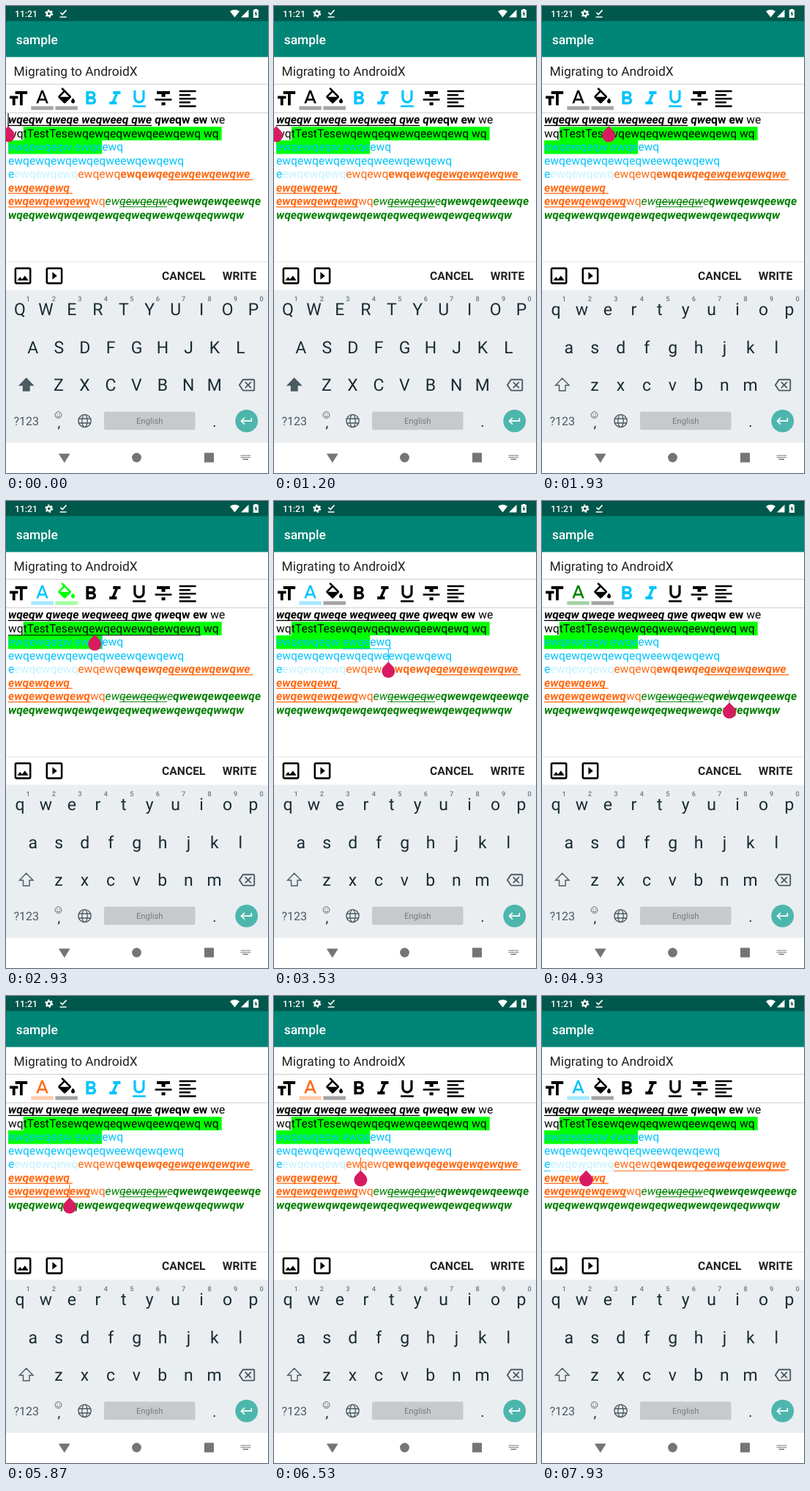
An HTML page that plays this animation: 358x636 px, repeating every 8000 ms.

```html
<!DOCTYPE html>
<html lang="en">
<head>
<meta charset="utf-8">
<title>Rich text editor</title>
<style>
html, body { margin: 0; width: 100%; height: 100%; overflow: hidden; background: #fff; }
svg { display: block; width: 100vw; height: 100vh; }
text { font-family: Roboto, "Noto Sans", sans-serif; white-space: pre; text-rendering: geometricPrecision; }
</style>
</head>
<body>
<svg id="stage" viewBox="0 0 358 636"></svg>
<script>
const NS = 'http://www.w3.org/2000/svg';
const BLACK = '#000', CYAN = '#00c4fb', PALE = '#c4f2ff', ORANGE = '#ff6a14', GREEN = '#008000', LIME = '#00ff00';
const KEY = '#1a2b32', HINT = '#68767c', KEY_ICON = '#4c5a61', NAV = '#757575';
const LOOP = 8000;
const stage = document.getElementById('stage');

function el(tag, attrs, parent = stage) {
  const node = document.createElementNS(NS, tag);
  set(node, attrs);
  parent.appendChild(node);
  return node;
}
function set(node, attrs) {
  for (const k in attrs) node.setAttribute(k, attrs[k]);
}
const rect = (x, y, width, height, fill, parent, rx = 0) => el('rect', { x, y, width, height, fill, rx }, parent);
const path = (d, attrs, parent) => el('path', { d, ...attrs }, parent);
const stroke = (d, color, width, parent) => path(d, { fill: 'none', stroke: color, 'stroke-width': width }, parent);
const circle = (cx, cy, r, attrs) => el('circle', { cx, cy, r, ...attrs });
function label(str, x, y, size, fill, attrs = {}) {
  const node = el('text', { x, y, 'font-size': size, fill, ...attrs });
  node.textContent = str;
  return node;
}
function icon(d, x, y, size, fill) {
  const g = el('g', { transform: `translate(${x} ${y}) scale(${size / 24})`, fill });
  path(d, {}, g);
  return g;
}

// Status bar and title
rect(0, 0, 358, 636, '#fff');
rect(0, 20, 358, 49.5, '#008577');
rect(0, 0, 358, 20.5, '#00574b');
label('11:21', 12, 14.6, 12.2, '#fff', { 'font-weight': 500 });
circle(58.8, 10.3, 3, { fill: 'none', stroke: '#fff', 'stroke-width': 2.3 });
circle(58.8, 10.3, 4.8, { fill: 'none', stroke: '#fff', 'stroke-width': 1.5, 'stroke-dasharray': '2.5 2.53' });
stroke('M74.3 8.8l2.8 2.8 5.4-6M73.6 15h9', '#fff', 1.6);
path('M306 7.3Q312.500 2.600 319 7.300L312.500 15.500Z', { fill: '#fff' });
path('M321 15.500L331.500 5V15.500Z', { fill: '#fff' });
path('M339.800 5V3.900h3.200V5h2v11h-7.200V5Z', { fill: '#fff' });
path('M341.900 6.800l-2.300 4.200h1.400v3.200l2.400-4.300h-1.500Z', { fill: '#00574b' });
label('sample', 13.7, 51.8, 17.42, '#fff', { 'font-weight': 500 });
label('Migrating to AndroidX', 10.6, 95, 17.42, '#212121');
rect(0, 106, 358, 1, '#cfcfcf');
rect(0, 145, 358, 1, '#cfcfcf');

// Format toolbar
const BAR = 'M0 20h24v4H0z';
const tools = [
  'M9 4v3h5v12h3V7h5V4H9zm-6 8h3v7h3v-7h3V9H3v3z',
  'M11 3L5.5 17h2.25l1.12-3h6.25l1.12 3h2.25L13 3h-2zm-1.38 9L12 5.67 14.38 12H9.62z',
  'M16.56 8.94L7.62 0 6.21 1.41l2.38 2.38-5.15 5.15c-.59.59-.59 1.54 0 2.12l5.5 5.5c.29.29.68.44 1.06.44s.77-.15 1.06-.44l5.5-5.5c.59-.58.59-1.53 0-2.12zM5.21 10L10 5.21 14.79 10H5.21zM19 11.5s-2 2.17-2 3.5c0 1.1.9 2 2 2s2-.9 2-2c0-1.33-2-3.500-2-3.500z',
  'M15.6 10.79c.97-.67 1.65-1.77 1.65-2.79 0-2.26-1.75-4-4-4H7v14h7.04c2.09 0 3.71-1.7 3.71-3.79 0-1.52-.86-2.82-2.15-3.42zM10 6.5h3c.83 0 1.5.67 1.5 1.5s-.67 1.5-1.5 1.5h-3v-3zm3.5 9H10v-3h3.5c.83 0 1.5.67 1.5 1.5s-.67 1.5-1.5 1.5z',
  'M10 4v3h2.21l-3.42 8H6v3h8v-3h-2.21l3.42-8H18V4z',
  'M12 17c3.31 0 6-2.69 6-6V3h-2.5v8c0 1.93-1.57 3.5-3.5 3.5S8.5 12.93 8.5 11V3H6v8c0 3.31 2.69 6 6 6zm-7 2v2h14v-2H5z',
  'M10 19h4v-3h-4v3zM5 4v3h5v3h4V7h5V4H5zM3 14h18v-2H3v2z',
  'M15 15H3v2h12v-2zm0-8H3v2h12V7zM3 13h18v-2H3v2zm0 8h18v-2H3v2zM3 3v2h18V3H3z'
].map((d, i) => icon(d, 1.2 + 33.1 * i, 111, 30.5, BLACK));
for (const i of [1, 2]) path(BAR, { 'fill-opacity': 0.36 }, tools[i]);

// Styled text: [text, color, flags]; B bold, I italic, U underline, S strike, H highlight
const SIZE = 15.68, PITCH = 18.5, TOP = 146;
const lines = [
  [['wqeqw qweqe weqweeq qwe', BLACK, 'BIU'], [' qwe', BLACK, 'BI'], ['qw ew', BLACK, 'B'], [' we', BLACK, '']],
  [['wq', BLACK, ''], ['tTestTesewqewqeqwewqeewqewq wq ', BLACK, 'H']],
  [['ewqewqeqw ewqe', CYAN, 'H'], ['ewq', CYAN, '']],
  [['ewqewqewqewqeqweewqewqewq', CYAN, '']],
  [['e', CYAN, ''], ['ewqewqewq', PALE, ''], ['ewqewq', ORANGE, ''], ['ewqe', ORANGE, 'B'], ['wqe', ORANGE, 'BI'], ['qewqewqewqwe ', ORANGE, 'BIU']],
  [['ewqewqewq ', ORANGE, 'BIU']],
  [['ewqewqewqewq', ORANGE, 'BIU'], ['wq', ORANGE, ''], ['ew', GREEN, 'I'], ['qewqeqw', GREEN, 'IUS'], ['e', GREEN, 'I'], ['qwewqewqeewqe', GREEN, 'BI']],
  [['wqeqwewqwqewqewqeqweqwewqewqeqwwqw', GREEN, 'BI']]
];
const marks = el('g', {}), prose = el('g', {}), rules = el('g', {});
const topOf = row => TOP + PITCH * row;

const rows = lines.map((runs, row) => {
  const base = topOf(row) + 14.3;
  const text = el('text', { x: 3, y: base, 'font-size': SIZE }, prose);
  for (const [str, fill, flags] of runs) {
    el('tspan', {
      fill,
      'font-weight': flags.includes('B') ? 700 : 400,
      'font-style': flags.includes('I') ? 'italic' : 'normal'
    }, text).textContent = str.replace(/ /g, '\u00a0');
  }
  return { text, base, runs };
});

function xAt(row, i) {
  const { text } = rows[row];
  return i < text.getNumberOfChars() ? text.getStartPositionOfChar(i).x : text.getEndPositionOfChar(i - 1).x;
}
function eachRun(row, fn) {
  let from = 0;
  for (const [str, color, flags] of rows[row].runs) {
    fn(from, from + str.length, color, flags);
    from += str.length;
  }
}
rows.forEach(({ base }, row) => eachRun(row, (a, b, color, flags) => {
  const x = xAt(row, a), w = xAt(row, b) - x;
  if (flags.includes('H')) rect(x, topOf(row), w, PITCH, LIME, marks);
  if (flags.includes('U')) rect(x, base + 1.7, w, flags.includes('B') ? 1.3 : 0.9, color, rules);
  if (flags.includes('S')) rect(x, base - 4.6, w, 0.9, color, rules);
}));

// Underlines of the word being composed
const words = [[1, 0, 29], [2, 10, 17], [3, 0, 25], [4, 0, 35]].map(([row, from, to]) => {
  const g = el('g', {});
  eachRun(row, (a, b, color) => {
    a = Math.max(a, from);
    b = Math.min(b, to);
    if (a < b) rect(xAt(row, a), topOf(row) + 17.7, xAt(row, b) - xAt(row, a), 1, color, g);
  });
  return g;
});
const caret = rect(0, 0, 1.2, PITCH, BLACK);
const handle = path('M-9-9H0A9 9 0 1 1-9 0Z', { fill: '#d81b60' });

// Action bar
rect(0, 348, 358, 1, '#e6e6e6');
icon('M19 5v14H5V5h14m0-2H5c-1.1 0-2 .9-2 2v14c0 1.1.9 2 2 2h14c1.1 0 2-.9 2-2V5c0-1.1-.9-2-2-2zm-4.86 8.86l-3 3.87L9 13.14 6 17h12l-3.86-5.14z', 7.8, 352.2, 30.5, BLACK);
icon('M10 8v8l5-4-5-4zm9-5H5c-1.1 0-2 .9-2 2v14c0 1.1.9 2 2 2h14c1.1 0 2-.9 2-2V5c0-1.1-.9-2-2-2zm0 16H5V5h14v14z', 50.7, 352.2, 30.5, BLACK);
label('CANCEL', 213, 373.4, SIZE, '#212121', { 'font-weight': 700 });
label('WRITE', 295.7, 373.4, SIZE, '#212121', { 'font-weight': 700 });

// Keyboard
const mid = { 'text-anchor': 'middle' };
rect(0, 386.5, 358, 208.5, '#eaeef1');
const keys = [['QWERTYUIOP', 19], ['ASDFGHJKL', 36.8], ['ZXCVBNM', 72]].flatMap(([set, x0], r) =>
  [...set].map((ch, i) => ({ ch, node: label(ch, x0 + 35.45 * i, 421.3 + 51.4 * r, 23, KEY, mid) })));
[...'1234567890'].forEach((d, i) => label(d, 30 + 35.45 * i, 402.4, 9.2, HINT, { ...mid, 'font-weight': 500 }));
const shift = path('M27.700 507L18.500 516.500H23.500V524H32V516.500H37Z', { stroke: KEY_ICON, 'stroke-width': 1.4 });
icon('M22 3H7c-.69 0-1.23.35-1.59.88L0 12l5.41 8.11c.36.53.9.89 1.59.89h15c1.1 0 2-.9 2-2V5c0-1.1-.9-2-2-2zm0 16H7.07L2.4 12l4.66-7H22v14zm-11.59-2L14 13.41 17.59 17 19 15.59 15.41 12 19 8.41 17.59 7 14 10.59 10.41 7 9 8.41 12.59 12 9 15.59z', 317.800, 505, 22.4, KEY_ICON);
label('?123', 10.5, 570.6, 16, KEY_ICON);
circle(71.5, 557, 4.4, { fill: 'none', stroke: KEY_ICON, 'stroke-width': 0.9 });
stroke('M69 558.200q2.500 2.800 5 0M69.300 555.700h1.300M72.400 555.700h1.300', KEY_ICON, 0.9);
label(',', 72.3, 574, 19, KEY, mid);
circle(107.5, 565, 8.6, { fill: 'none', stroke: KEY_ICON, 'stroke-width': 1.4 });
el('ellipse', { cx: 107.5, cy: 565, rx: 3.7, ry: 8.6, fill: 'none', stroke: KEY_ICON, 'stroke-width': 1.3 });
stroke('M99.600 562h15.800M99.600 568h15.800', KEY_ICON, 1.3);
rect(134, 552.5, 124.5, 24.8, '#c6cacc', stage, 2);
label('English', 196.2, 569, 11.3, '#767b7e', mid);
label('.', 285, 573, 20, KEY, mid);
circle(328.7, 565.2, 15.4, { fill: '#4db6ac' });
icon('M19 7v4H5.83l3.58-3.59L8 6l-6 6 6 6 1.41-1.41L5.83 13H21V7z', 318.700, 555.200, 20, '#fff');

// Navigation bar
rect(0, 595, 358, 41, '#fff');
path('M72.500 610H87L79.800 621.500Z', { fill: NAV, stroke: NAV, 'stroke-width': 0.8, 'stroke-linejoin': 'round' });
circle(178.5, 615, 6.4, { fill: NAV });
rect(271, 608.5, 13, 13, NAV, stage, 0.6);
for (const y of [611.5, 614]) for (let i = 0; i < 6; i++) rect(320.8 + 2.3 * i, y, 1.5, 1.5, NAV);
rect(323.5, 616.7, 7.5, 1.4, NAV);

// Timeline: each step changes some fields of the state
const steps = [
  [0, { caps: true, caret: [0, 0], handle: [0, 0], on: true, ink: BLACK, fill: BLACK, format: 'BIU', word: -1 }],
  [200, { on: false }],
  [730, { on: true }],
  [1200, { on: false }],
  [1470, { caret: [0, 10], on: true }],
  [1530, { handle: [0, 10], caps: false }],
  [1930, { on: false }],
  [2130, { caret: [1, 14], on: true, fill: LIME, format: '' }],
  [2200, { handle: [1, 14] }],
  [2330, { word: 0 }],
  [2670, { on: false }],
  [2930, { caret: [2, 14], on: true, ink: CYAN }],
  [3000, { handle: [2, 14] }],
  [3200, { word: 1 }],
  [3470, { caret: [3, 16], fill: BLACK }],
  [3530, { handle: [3, 16] }],
  [3730, { word: 2 }],
  [4000, { caret: [4, 21], ink: ORANGE, format: 'BI' }],
  [4070, { handle: [4, 21] }],
  [4270, { word: 3 }],
  [4530, { on: false }],
  [4670, { caret: [6, 27], on: true, ink: GREEN }],
  [4730, { handle: [6, 27] }],
  [4930, { word: -1 }],
  [5200, { caret: [7, 20] }],
  [5270, { handle: [7, 20] }],
  [5800, { caret: [6, 9], ink: ORANGE, format: 'BIU' }],
  [5870, { handle: [6, 9] }],
  [6330, { on: false }],
  [6530, { caret: [4, 12], handle: [4, 12], on: true, format: '' }],
  [6730, { word: 3 }],
  [7070, { caret: [4, 6], ink: PALE }],
  [7130, { handle: [4, 6] }],
  [7600, { on: false }],
  [7930, { ink: CYAN }]
];
const stateAt = t => Object.assign({}, ...steps.filter(([at]) => at <= t).map(([, change]) => change));

function draw(t) {
  const s = stateAt(t);
  set(tools[1], { fill: s.ink });
  set(tools[2], { fill: s.fill });
  [...'BIU'].forEach((f, i) => set(tools[3 + i], { fill: s.format.includes(f) ? CYAN : BLACK }));
  words.forEach((g, i) => set(g, { visibility: i === s.word ? 'visible' : 'hidden' }));

  const [row, i] = s.caret;
  set(caret, {
    x: xAt(row, i) - 0.6, y: topOf(row),
    fill: s.ink === GREEN ? '#8a8a8a' : s.ink,
    visibility: s.on ? 'visible' : 'hidden'
  });
  const [hRow, hi] = s.handle;
  set(handle, { transform: `translate(${xAt(hRow, hi)} ${topOf(hRow + 1) + 11.8}) rotate(45)` });

  for (const { ch, node } of keys) node.textContent = s.caps ? ch : ch.toLowerCase();
  set(shift, { fill: s.caps ? KEY_ICON : 'none' });
}

const start = performance.now();
function tick() {
  draw((performance.now() - start) % LOOP);
  requestAnimationFrame(tick);
}
tick();
</script>
</body>
</html>
```
